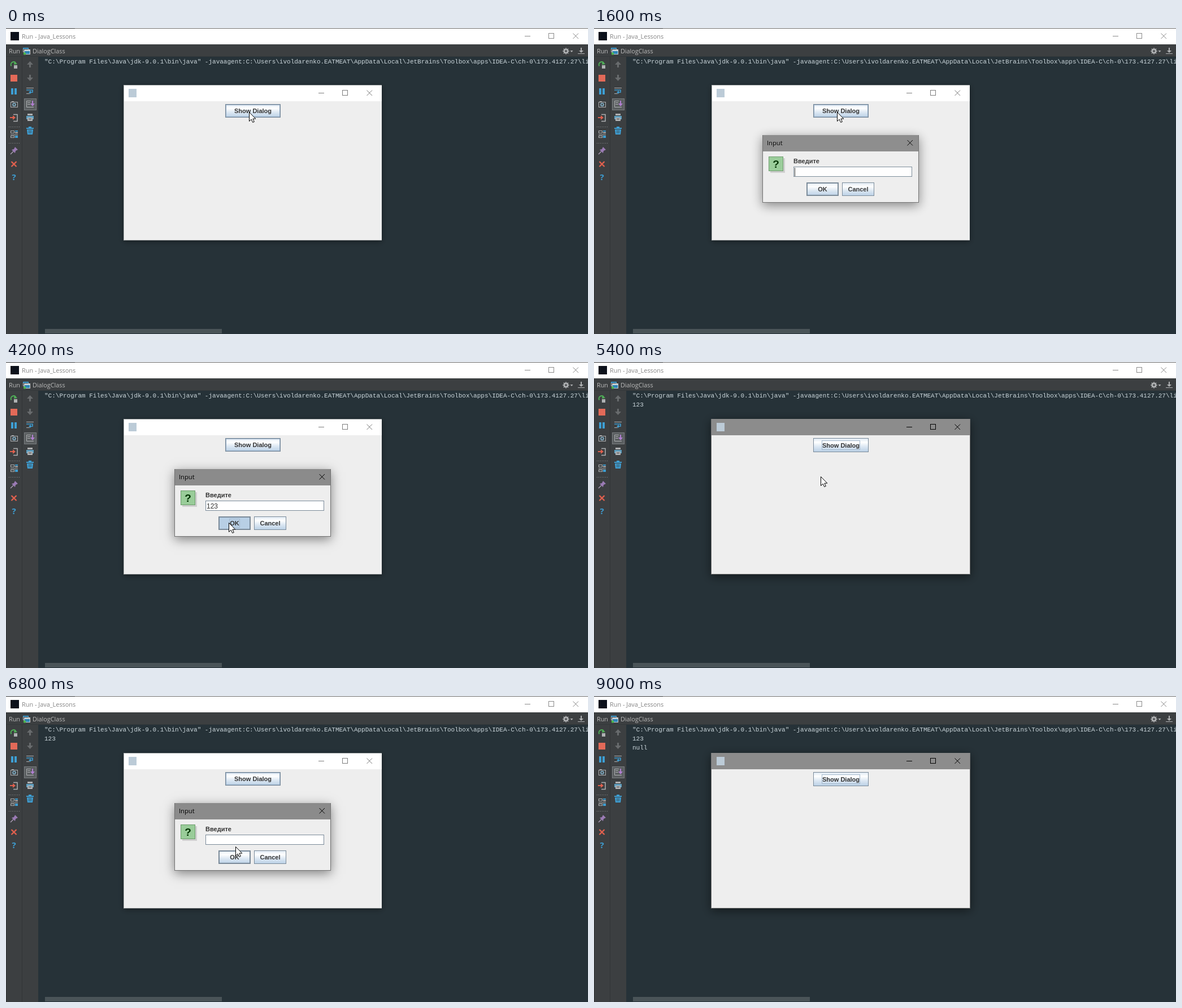
Animation, 1030 px wide and 543 px high, one loop 9600 ms. Source, as an HTML page with a canvas:

```html
<!DOCTYPE html>
<html lang="en">
<head>
<meta charset="utf-8">
<title>Input dialog</title>
<style>
html, body { margin: 0; width: 100%; height: 100%; overflow: hidden; background: #263238; }
canvas { display: block; width: 1030px; height: 543px; }
</style>
</head>
<body>
<canvas id="stage" width="1030" height="543"></canvas>
<script>
const W = 1030, H = 543, LOOP = 9600, STEP = 200;
const UI = '"Open Sans", "Noto Sans", sans-serif';
const ARIAL = '"Liberation Sans", Arial, sans-serif';
const MONO = '11px "Liberation Mono", "Courier New", monospace';
const BOLD = 'bold 11px ' + ARIAL;
const GREY = '#afb1b3', BLUE = '#3e9fd4', RED = '#e0604e', STEEL = '#7a8a99';
const COMMAND = String.raw`"C:\Program Files\Java\jdk-9.0.1\bin\java" -javaagent:C:\Users\ivoldarenko.EATMEAT\AppData\Local\JetBrains\Toolbox\apps\IDEA-C\ch-0\173.4127.27\lib`;

const screen = document.getElementById('stage').getContext('2d');
const layer = makeLayer(), back = makeLayer();
let g = screen;

function makeLayer() {
  const c = document.createElement('canvas');
  c.width = W;
  c.height = H;
  return c.getContext('2d');
}

// Drawing helpers
function rect(x, y, w, h, color) {
  g.fillStyle = color;
  g.fillRect(x, y, w, h);
}
function frame(x, y, w, h, color) {
  g.strokeStyle = color;
  g.lineWidth = 1;
  g.strokeRect(x + 0.5, y + 0.5, w - 1, h - 1);
}
function text(s, x, y, font, color, align = 'left') {
  g.font = font;
  g.fillStyle = color;
  g.textAlign = align;
  g.fillText(s, x, y);
}
function trace(pts) {
  g.beginPath();
  for (let i = 0; i < pts.length; i += 2) g.lineTo(pts[i], pts[i + 1]);
}
function poly(color, ...pts) {
  trace(pts);
  g.fillStyle = color;
  g.fill();
}
function line(color, width, ...pts) {
  trace(pts);
  g.strokeStyle = color;
  g.lineWidth = width;
  g.stroke();
}
function disc(x, y, r, color) {
  g.beginPath();
  g.arc(x, y, r, 0, 7);
  g.fillStyle = color;
  g.fill();
}
function cross(x, y, size, color, width = 1) {
  line(color, width, x, y, x + size, y + size);
  line(color, width, x + size, y, x, y + size);
}
function shadowed(x, y, w, h, color, blur, drop, alpha) {
  g.save();
  g.shadowColor = `rgba(0,0,0,${alpha})`;
  g.shadowBlur = blur;
  g.shadowOffsetY = drop;
  rect(x, y, w, h, color);
  g.restore();
}
function controls(x, y, color) {
  rect(x, y + 5, 10, 1, color);
  frame(x + 42, y, 10, 10, color);
  cross(x + 85.5, y + 0.5, 9.5, color);
}

// IDE window
function titleBar() {
  rect(0, 0, W, 29, '#ffffff');
  rect(0, 0, W, 1, '#6b6b6b');
  rect(0, 0, 122, 1, '#2d3033');
  rect(8, 7, 15, 15, '#0c111b');
  text('Run - Java_Lessons', 28, 19, '10.9px ' + UI, '#858585');
  controls(918, 9, '#8a8a8a');
}

function header() {
  rect(0, 29, W, 22, '#3c3f41');
  rect(0, 50, W, 1, '#34383a');
  text('Run', 5, 45, '10.8px ' + UI, '#bbbbbb');
  text('DialogClass', 47, 45, '10.8px ' + UI, '#bbbbbb');
  frame(30, 35, 10, 8, '#b5bcc1');
  rect(30, 35, 10, 2, BLUE);
  rect(32, 38, 11, 9, '#c8d0d4');
  rect(33, 41, 9, 5, '#2f86b8');
  disc(33, 45.5, 2.3, '#4fb64f');

  for (let i = 0; i < 4; i++) {
    const c = Math.cos(i * Math.PI / 4) * 5.6, s = Math.sin(i * Math.PI / 4) * 5.6;
    line(GREY, 2, 991 - c, 41 - s, 991 + c, 41 + s);
  }
  disc(991, 41, 4, GREY);
  disc(991, 41, 1.7, '#3c3f41');
  poly(GREY, 998.5, 40, 1003.5, 40, 1001, 43);
  rect(1017, 35, 2, 6, GREY);
  poly(GREY, 1014, 40, 1022, 40, 1018, 44);
  rect(1012, 45, 12, 1, GREY);
}

function dots(y) {
  for (let x = 5; x < 25; x += 3) rect(x, y, 1, 1, '#8a8d8f');
}

function runIcons() {
  // rerun
  g.beginPath();
  g.arc(13.5, 65, 4.8, 2.6, 5.6);
  g.strokeStyle = '#4fae57';
  g.lineWidth = 2;
  g.stroke();
  poly('#4fae57', 15, 59, 20, 64, 14, 65);
  rect(14, 66, 6, 6, GREY);
  rect(8, 83, 12, 12, '#e36a58');
  rect(9, 107, 4, 11, BLUE);
  rect(15, 107, 4, 11, BLUE);
  // camera
  frame(8, 131, 13, 10, GREY);
  rect(10, 130, 4, 2, GREY);
  disc(14.5, 136, 3.3, '#7fa9bf');
  disc(14.5, 136, 1.4, '#3c3f41');
  // exit
  line(GREY, 1.5, 13, 153.5, 20, 153.5, 20, 165.5, 13, 165.5);
  rect(7, 158, 6, 2, RED);
  poly(RED, 12, 155, 17, 159, 12, 163);
  dots(175);
  // layout
  frame(8, 182, 7, 5, GREY);
  rect(16, 182, 5, 2, BLUE);
  rect(16, 185, 5, 2, GREY);
  rect(8, 189, 13, 1, GREY);
  frame(8, 191, 7, 4, GREY);
  rect(16, 191, 5, 4, BLUE);
  dots(204);
  // pin
  line('#b3a2bd', 1.2, 8, 224, 13, 219);
  poly('#9b7bb5', 10, 216, 14, 215, 16, 211, 21, 216, 17, 218, 16, 222);
  cross(9.5, 237, 9, RED, 2.4);
  text('?', 14, 270, 'bold 15px ' + UI, BLUE, 'center');
}

function consoleIcons() {
  const dim = '#686b6d';
  rect(41, 64, 3, 6, dim);
  poly(dim, 37, 65, 42.5, 59, 48, 65);
  rect(41, 83, 3, 6, dim);
  poly(dim, 37, 88, 42.5, 94, 48, 88);
  // soft wrap
  rect(36, 106, 13, 1, GREY);
  rect(36, 116, 6, 1, GREY);
  line(BLUE, 1.5, 36, 110, 47, 110, 47, 114, 43, 114);
  poly(BLUE, 44, 111, 44, 117, 40, 114);
  // scroll to end
  rect(32, 125, 22, 21, '#5a5e60');
  frame(32, 125, 22, 21, '#7b7f82');
  line(GREY, 1, 44, 129.5, 36.5, 129.5, 36.5, 140.5, 49, 140.5);
  rect(38, 132, 5, 1, GREY);
  rect(38, 135, 5, 1, GREY);
  rect(46, 129, 2, 6, '#b07fd0');
  poly('#b07fd0', 43, 134, 51, 134, 47, 139);
  // printer
  rect(38, 152, 9, 3, GREY);
  rect(36, 156, 13, 6, '#5f9fc0');
  rect(38, 159, 9, 6, GREY);
  rect(40, 161, 5, 1, '#3c3f41');
  // bin
  rect(36, 177, 13, 2, BLUE);
  rect(40, 175, 5, 2, BLUE);
  poly(BLUE, 37, 180, 48, 180, 47, 189, 38, 189);
  for (let x = 40; x < 46; x += 2) rect(x, 181, 1, 6, '#3c5a6a');
}

function paintBack() {
  g = back;
  rect(0, 0, W, H, '#263238');
  titleBar();
  header();
  rect(0, 51, 57, H - 51, '#3c3f41');
  rect(28, 51, 1, H - 51, '#323537');
  rect(0, 29, 1, H - 29, '#303335');
  runIcons();
  consoleIcons();
  rect(69, 534, 313, 8, '#4a5458');
  text(COMMAND, 68, 63, MONO, '#cbd6db');
  g = screen;
}

// Swing parts
function button(label, x, y, w, h, { inner, ring, pressed }) {
  let fill = '#b8cfe5';
  if (!pressed) {
    fill = g.createLinearGradient(0, y, 0, y + h);
    [[0, '#dde8f3'], [0.3, '#ffffff'], [0.6, '#dde8f3'], [1, '#b8cfe5']]
      .forEach(([p, c]) => fill.addColorStop(p, c));
  }
  rect(x, y, w, h, fill);
  frame(x, y, w, h, STEEL);
  if (inner) frame(x + 1, y + 1, w - 2, h - 2, inner);
  const mid = x + w / 2;
  text(label, mid, y + Math.round(h / 2) + 4, BOLD, '#333333', 'center');
  if (ring) {
    const rw = Math.round(g.measureText(label).width) + 2;
    frame(Math.round(mid - rw / 2), y + 4, rw, h - 8, '#a3b8cc');
  }
}

function swingWindow(s) {
  if (s.active) {
    shadowed(207, 101, 459, 276, '#757575', 16, 4, 0.5);
    rect(208, 101, 457, 29, '#8c8c8c');
  } else {
    shadowed(208, 101, 457, 276, '#a9acad', 9, 2, 0.4);
    rect(209, 102, 456, 28, '#ffffff');
  }
  rect(208 + !s.active, 130, 457 - !s.active, 246, '#eeeeee');
  rect(217, 108, 14, 15, '#bccbd7');
  controls(553, 110, s.active ? '#000000' : '#7c7c7c');
  if (s.active && !s.over) button('Show Dialog', 388, 135, 98, 25, { ring: true });
  else button('Show Dialog', 388, 135, 98, 24, { inner: '#93abc4', ring: s.active, pressed: s.pressShow });
}

function dialog(s) {
  shadowed(298, 190, 277, 120, '#707070', 18, 5, 0.45);
  rect(299, 190, 275, 29, s.closing ? '#ffffff' : '#8b8b8b');
  rect(299, 219, 275, 90, '#eeeeee');
  text('Input', 306, 208, '11.2px ' + UI, '#000000');
  cross(554.5, 199, 9.5, '#000000');

  rect(312, 231, 26, 26, '#cfcfcf');
  rect(309, 228, 26, 26, '#99cc99');
  frame(309, 228, 26, 26, '#6b9c6b');
  text('?', 322, 248, 'bold 19px ' + ARIAL, '#003300', 'center');

  text('Введите', 353, 240, BOLD, '#333333');
  rect(353, 246, 210, 18, '#ffffff');
  frame(353, 246, 210, 18, STEEL);
  text(s.typed, 355, 260, '12px ' + ARIAL, '#333333');
  if (s.caret) rect(355 + Math.round(g.measureText(s.typed).width), 248, 1, 15, '#333333');

  button('OK', 376, 274, 57, 24, { inner: STEEL, ring: s.pressOk, pressed: s.pressOk });
  button('Cancel', 439, 274, 57, 24, {
    inner: s.overCancel && '#93abc4', ring: s.pressCancel, pressed: s.pressCancel
  });
}

function arrow(x, y) {
  const shape = [0, 0, 0, 16, 3.7, 12.6, 6.2, 18, 8.8, 16.9, 6.4, 11.6, 11.3, 11.6];
  g.save();
  g.translate(x + 0.5, y + 0.5);
  poly('#ffffff', ...shape);
  g.closePath();
  g.strokeStyle = '#000000';
  g.lineWidth = 1;
  g.stroke();
  g.restore();
}

function beam(x, y) {
  rect(x, y - 7, 1, 15, '#000000');
  for (const dy of [-8, 8]) {
    rect(x - 3, y + dy, 3, 1, '#000000');
    rect(x + 1, y + dy, 3, 1, '#000000');
  }
}

// Timeline: pointer stops as [ms, x, y]
const PATH = [
  [0, 430, 149], [1600, 430, 149], [2200, 391, 254], [2400, 393, 255], [3400, 393, 255],
  [4000, 395, 283], [4200, 394, 285], [4800, 394, 285], [5400, 401, 203], [5800, 424, 144],
  [6000, 424, 142], [6200, 424, 142], [6800, 406, 267], [7200, 459, 290], [7400, 460, 291],
  [8200, 460, 291], [8800, 524, 242], [LOOP, 524, 242]
];

function pointer(t) {
  const i = PATH.findIndex(p => p[0] > t);
  const [t0, x0, y0] = PATH[i - 1], [t1, x1, y1] = PATH[i];
  const k = (t - t0) / (t1 - t0);
  return [Math.round(x0 + (x1 - x0) * k), Math.round(y0 + (y1 - y0) * k)];
}

// Opacity and scale of the dialog, from opening to closing
function popup(t, open, close) {
  if (t < open || t >= close + STEP) return null;
  if (t >= close) return [0.04, 0.96];
  if (t < open + STEP) return [0.5, 0.95];
  return [t < open + 2 * STEP ? 0.97 : 1, 1];
}

function state(t) {
  const within = (a, b) => t >= a && t < b;
  const first = t < 5000;
  const keys = Math.max(0, Math.min(3, (t - 2400) / STEP));
  const sinceOpen = t - (first ? 1600 : 6200);
  return {
    active: within(1200, 1400) || within(4400, 6000) || t >= 7800,
    over: within(1200, 1400) || within(5800, 6000),
    pressShow: within(1200, 1400) || within(5800, 6000),
    popup: first ? popup(t, 1400, 4400) : popup(t, 6000, 7800),
    closing: within(4400, 4600) || within(7800, 8000),
    typed: first ? '123'.slice(0, keys) : '',
    caret: sinceOpen >= 0 && sinceOpen % 1000 < 500 && !within(4000, 4600) && !within(7400, 8000),
    pressOk: within(4200, 4600),
    overCancel: within(7200, 8000),
    pressCancel: within(7600, 8000),
    output: ['123', 'null'].slice(0, (t >= 4600) + (t >= 8000))
  };
}

function draw(t) {
  const s = state(t);
  g = screen;
  g.drawImage(back.canvas, 0, 0);
  s.output.forEach((row, i) => text(row, 68, 79 + 16 * i, MONO, '#cbd6db'));
  swingWindow(s);
  if (s.popup) {
    const [alpha, scale] = s.popup;
    g = layer;
    g.clearRect(0, 0, W, H);
    dialog(s);
    g = screen;
    g.save();
    g.globalAlpha = alpha;
    g.translate(436, 249);
    g.scale(scale, scale);
    g.drawImage(layer.canvas, -436, -249);
    g.restore();
  }
  const [x, y] = pointer(t);
  if (t >= 2200 && t < 3600) beam(x, y);
  else if (t < 9000) arrow(x, y);
}

const start = performance.now();
function tick() {
  const t = (performance.now() - start) % LOOP;
  draw(Math.floor(t / STEP) * STEP);
  requestAnimationFrame(tick);
}

paintBack();
tick();
</script>
</body>
</html>
```
